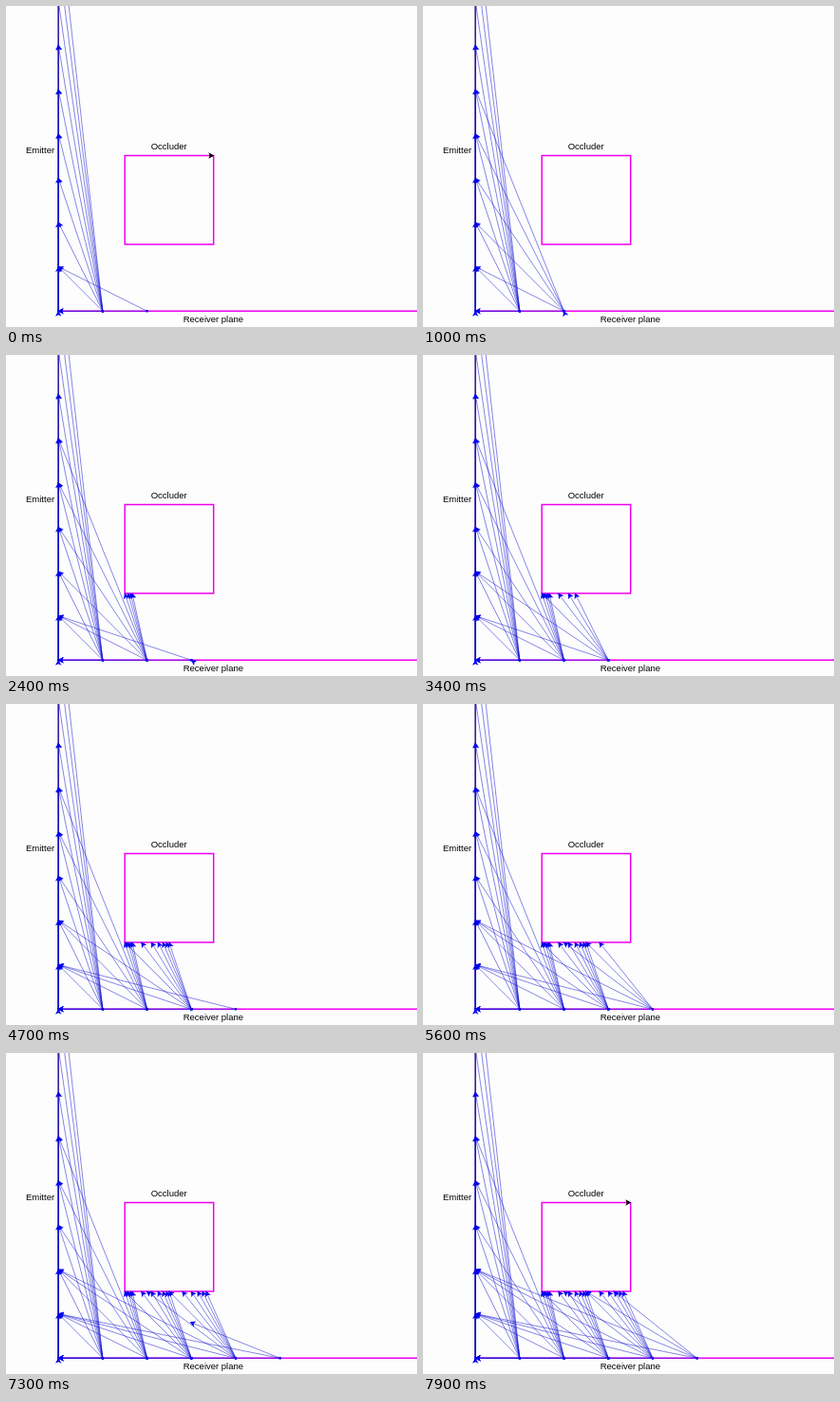
Write an HTML page with a canvas that moves like this. It is 433 px wide and 338 px high and loops after 8 s.

```html
<!DOCTYPE html>
<html lang="en">
<head>
<meta charset="utf-8">
<title>Emitter, occluder and receiver</title>
<style>
  html, body { margin: 0; width: 100%; height: 100%; overflow: hidden; background: #fdfdfd; }
  canvas { display: block; width: 433px; height: 338px; }
</style>
</head>
<body>
<canvas id="stage"></canvas>
<script>
const W = 433, H = 338, LOOP = 8000, TICK = 100;
const canvas = document.getElementById('stage');
const ratio = window.devicePixelRatio || 1;
canvas.width = W * ratio;
canvas.height = H * ratio;
const ctx = canvas.getContext('2d');
ctx.scale(ratio, ratio);

const EMITTER_X = 55.2, FLOOR = 321.3, STEP = 46.7;
const BOX = { left: 125.2, top: 157.5, right: 218.7, bottom: 251 };
const BLUE = '#0000f0', RAY = '#0c0cd0', MAGENTA = '#f000f0', BROWN = '#98532f';

// Groups of rays: receiver index, first and last sample, start and end time.
const GROUPS = [
  [0, 0, 9, -2, -1], [1, 0, 9, -2, -1], [2, 0, 1, -2, -1],
  [2, 2, 5, 20, 1000], [2, 6, 9, 1000, 1810],
  [3, 0, 1, 1830, 2390], [3, 2, 3, 2400, 2800], [3, 4, 6, 2800, 3380], [3, 7, 9, 3420, 4000],
  [4, 0, 1, 4010, 4650], [4, 2, 4, 4720, 5450], [4, 5, 5, 5450, 5600], [4, 6, 9, 5750, 6590],
  [5, 0, 2, 6620, 7530], [5, 3, 4, 7530, 7890]
];
// Ticks at which the idle black cursor flashes.
const FLASHES = [0, 15, 26, 35, 44, 54, 62, 71, 79];

const lerp = (a, b, u) => a + (b - a) * u;
const clamp = u => Math.max(0, Math.min(1, u));

function makeRay(receiver, k, start, end) {
  const base = EMITTER_X + receiver * STEP;
  const rise = k * STEP;
  const dx = EMITTER_X - base;
  const hitX = base + dx * (FLOOR - BOX.bottom) / (rise || 1);
  const blocked = hitX > BOX.left - 1;
  return {
    base, start, end,
    from: k === 0 ? base - STEP : base,
    x: blocked ? hitX : EMITTER_X,
    y: blocked ? BOX.bottom : FLOOR - rise,
    angle: receiver === 0 ? -Math.PI / 2 : Math.atan2(-rise, dx)
  };
}

const rays = GROUPS.flatMap(([receiver, first, last, start, end]) => {
  const count = last - first + 1;
  return Array.from({ length: count }, (_, i) => makeRay(
    receiver, first + i, lerp(start, end, i / count), lerp(start, end, (i + 1) / count)));
});

function line(x1, y1, x2, y2, color, width) {
  ctx.strokeStyle = color;
  ctx.lineWidth = width;
  ctx.beginPath();
  ctx.moveTo(x1, y1);
  ctx.lineTo(x2, y2);
  ctx.stroke();
}

function arrow(x, y, angle, color) {
  ctx.save();
  ctx.translate(x, y);
  ctx.rotate(angle);
  ctx.fillStyle = color;
  ctx.beginPath();
  ctx.moveTo(0.6, 0);
  ctx.lineTo(-5.4, -3.2);
  ctx.lineTo(-4, 0);
  ctx.lineTo(-5.4, 3.2);
  ctx.closePath();
  ctx.fill();
  ctx.restore();
}

// Each ray turns, shoots out to its hit point, then returns to the receiver.
function drawRay(ray, t) {
  const u = (t - ray.start) / (ray.end - ray.start);
  const out = clamp((u - 0.1) / 0.35);
  const back = clamp((u - 0.45) / 0.55);
  const origin = lerp(ray.from, ray.base, clamp(u / 0.1));
  const at = r => [lerp(origin, ray.x, r), lerp(FLOOR, ray.y, r)];

  if (out > 0) line(ray.base, FLOOR, ...at(out), RAY, 0.5);
  if (out === 1) arrow(ray.x, ray.y, ray.angle, BLUE);
  if (u < 1) arrow(...at(out - back), ray.angle, BLUE);
  ctx.fillStyle = BLUE;
  ctx.fillRect(origin - 1, FLOOR - 1.2, 2, 2.2);
}

function drawScene() {
  line(EMITTER_X, 0, EMITTER_X, FLOOR, BROWN, 1.3);
  line(EMITTER_X, FLOOR, W, FLOOR, MAGENTA, 1.5);
  ctx.strokeStyle = MAGENTA;
  ctx.lineWidth = 1.5;
  ctx.strokeRect(BOX.left, BOX.top, BOX.right - BOX.left, BOX.bottom - BOX.top);
  ctx.fillStyle = '#000';
  ctx.font = '9.5px "Liberation Sans", Arial, sans-serif';
  ctx.fillText('Emitter', 21, 155.3);
  ctx.fillText('Occluder', 152.7, 150.5);
  ctx.fillText('Receiver plane', 186.7, 333);
}

function draw(time) {
  const tick = Math.floor((time % LOOP) / TICK);
  const t = tick * TICK;
  ctx.fillStyle = '#fdfdfd';
  ctx.fillRect(0, 0, W, H);
  drawScene();
  for (const ray of rays) {
    if (t >= ray.start) drawRay(ray, t);
  }
  if (FLASHES.includes(tick)) arrow(BOX.right, BOX.top, 0, '#000');
}

let startTime = null;
function frame(now) {
  if (startTime === null) startTime = now;
  draw(now - startTime);
  requestAnimationFrame(frame);
}
draw(0);
requestAnimationFrame(frame);
</script>
</body>
</html>
```
